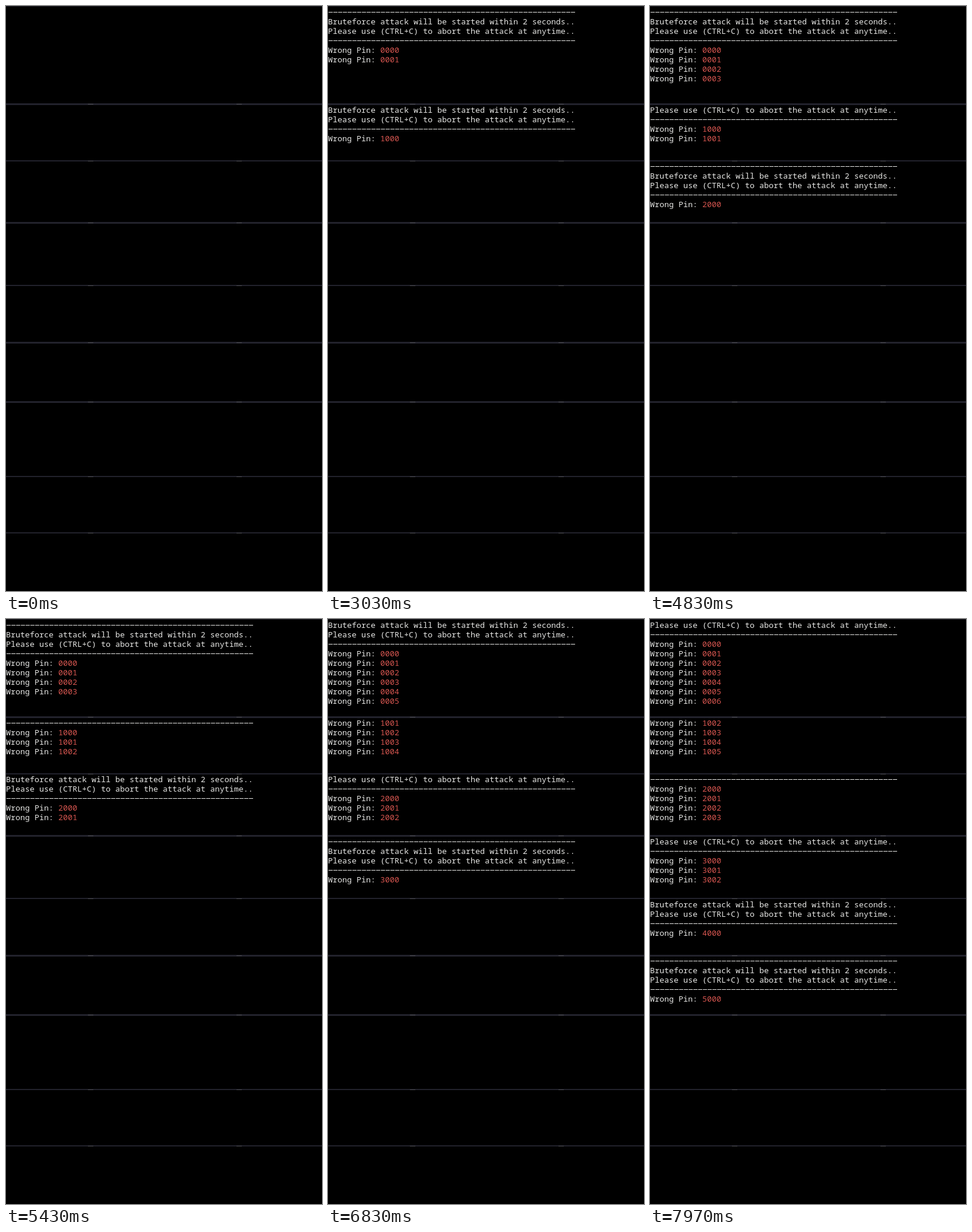
Animation of 532 by 986 pixels, one loop 8 s. Source, as an HTML page with a canvas:

```html
<!DOCTYPE html>
<html lang="en">
<head>
<meta charset="utf-8">
<title>Terminal panes</title>
<style>
html, body { margin: 0; width: 532px; height: 986px; overflow: hidden; background: #000; }
canvas { display: block; }
</style>
</head>
<body>
<canvas id="stage" width="532" height="986"></canvas>
<script>
const ctx = document.getElementById('stage').getContext('2d');
const LOOP = 8000, PERIOD = 950, ROW = 16;
const TEXT = '#e6e6e4', PIN = '#d2544e';
const RULE = '-';
const HEADER = [
  RULE,
  'Bruteforce attack will be started within 2 seconds..',
  'Please use (CTRL+C) to abort the attack at anytime..',
  RULE
];
// y: centre of the first row, rows: visible lines, start: time of the first pin
const panes = [
  { y: 10, rows: 9, start: 1970 },
  { y: 175, rows: 4, start: 3000 },
  { y: 270, rows: 5, start: 4330 },
  { y: 375, rows: 5, start: 5980 },
  { y: 481, rows: 4, start: 7150 },
  { y: 576, rows: 5, start: 7900 }
];
const borders = [[164, 3], [260, 2], [364, 3], [470, 2], [566, 3], [666, 3], [792, 2], [887, 2]];

function rect(x, y, width, height, color) {
  ctx.fillStyle = color;
  ctx.fillRect(x, y, width, height);
}

function drawBorders() {
  rect(0, 0, 532, 1, '#20202a');
  for (const [y, height] of borders) {
    rect(0, y, 532, height, '#22222c');
    for (const x of [138, 388]) rect(x, y + 1, 9, 1, '#48484c');
  }
}

function drawText(text, x, mid, color) {
  ctx.fillStyle = color;
  ctx.fillText(text, x, mid + 5);
}

function drawPane({ y, rows, start }, index, t) {
  if (t < start) return;
  const count = Math.floor((t - start) / PERIOD) + 1;
  const pins = Array.from({ length: count }, (_, i) => String(index * 1000 + i).padStart(4, '0'));
  [...HEADER, ...pins].slice(-rows).forEach((line, i) => {
    const mid = y + i * ROW;
    if (line === RULE) {
      for (let x = 1; x < 416; x += 8) rect(x, mid, 7, 1, TEXT);
    } else if (line.length === 4) {
      drawText('Wrong Pin:', 0, mid, TEXT);
      drawText(line, 88, mid, PIN);
    } else {
      drawText(line, 0, mid, TEXT);
    }
  });
}

function draw(now) {
  const t = now % LOOP;
  rect(0, 0, 532, 986, '#000');
  ctx.font = '300 13.333px "Noto Sans Mono", "DejaVu Sans Mono", monospace';
  drawBorders();
  panes.forEach((pane, i) => drawPane(pane, i, t));
}

const origin = performance.now();
function tick() {
  draw(performance.now() - origin);
  requestAnimationFrame(tick);
}
tick();
</script>
</body>
</html>
```
